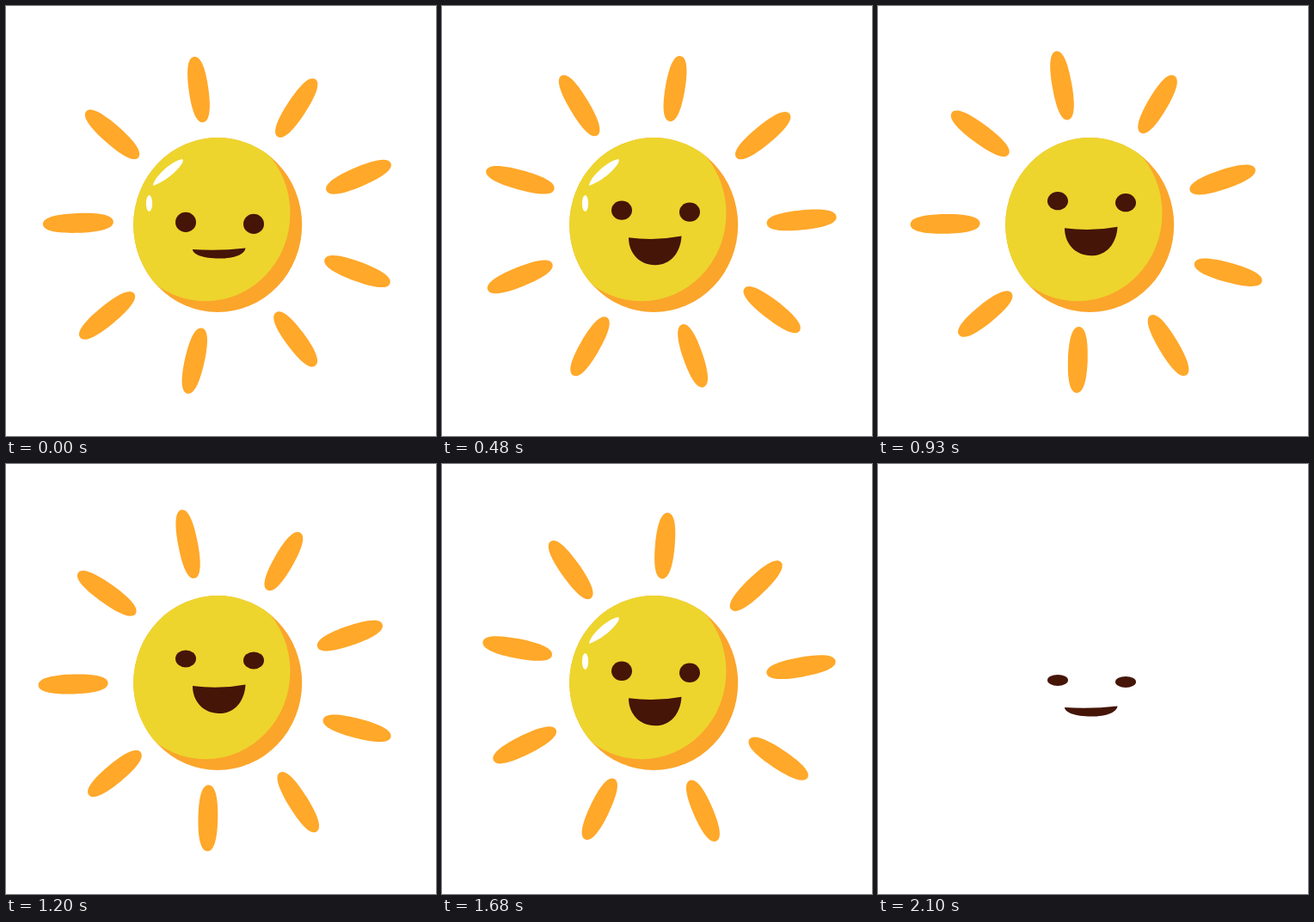
These frames come from a looping animation (500 by 500 pixels, 2.13 s). An HTML page with a canvas:

```html
<!DOCTYPE html>
<html lang="en">
<head>
<meta charset="utf-8">
<title>Smiling sun</title>
<style>
html, body { margin: 0; width: 100%; height: 100%; overflow: hidden; background: #fff; }
canvas { display: block; width: 500px; height: 500px; }
</style>
</head>
<body>
<canvas id="stage" width="500" height="500"></canvas>
<script>
const ctx = document.getElementById('stage').getContext('2d');
const LOOP = 2130, STEP = 30, SUN_END = 2100, TOP = 1050, REST = 2070;
const YELLOW = '#edd52d', BROWN = '#451508';

// One entry per ray: angle offset, distance, own tilt, half length
const RAYS = [
  [-0.2, 159, 2, 38.5], [2.3, 160.5, 0.5, 40], [0.6, 168, -4, 40.7],
  [-1.1, 166.4, 1.2, 40.5], [-2.9, 158.5, -4, 38.5], [1.1, 162, 1.2, 39],
  [1.3, 170.7, -1, 40.5], [0.2, 167.4, -2.5, 41], [-1, 165, 2.3, 40.5]
];

// Keys: [time, value]
const LIFT = [[0, 0], [480, 13.8], [720, 20.2], [1050, 25.8], [1200, 25], [1500, 16], [1890, 4.8], [2100, 0]];
const EYE = [[0, 11.6], [480, 11.2], [720, 11], [1200, 10], [1500, 11.3], [1680, 11.3], [1860, 1], [1920, 1], [2100, 6.5]];
const MOUTH = [[0, 10.5], [40, 10.5], [400, 32], [1680, 32], [2080, 10.5]];
const GLOSS = [[0, 1], [570, 1], [660, 0], [1440, 0], [1530, 1], [1710, 1], [1800, 0]];

const rad = deg => deg * Math.PI / 180;
const clamp = u => Math.min(1, Math.max(0, u));
const smooth = u => u * u * (3 - 2 * u);
const linear = u => u;

function keyed(keys, t, ease) {
  for (let i = 1; i < keys.length; i++) {
    const [t0, a] = keys[i - 1], [t1, b] = keys[i];
    if (t <= t1) return a + (b - a) * ease((t - t0) / (t1 - t0));
  }
  return keys[keys.length - 1][1];
}

// Cubic curve through the keys, level at the extremes
function curve(keys, t) {
  const last = keys.length - 1;
  const slope = i => {
    const p = keys[Math.max(0, i - 1)], k = keys[i], n = keys[Math.min(last, i + 1)];
    if (i > 0 && i < last && (k[1] - p[1]) * (n[1] - k[1]) <= 0) return 0;
    return (n[1] - p[1]) / (n[0] - p[0]);
  };
  let i = 0;
  while (i < last - 1 && t > keys[i + 1][0]) i++;
  const [t0, a] = keys[i], [t1, b] = keys[i + 1];
  const d = t1 - t0, u = clamp((t - t0) / d), s = smooth(u);
  return a + (b - a) * s + d * u * (1 - u) * ((1 - u) * slope(i) - u * slope(i + 1));
}

function ellipse(x, y, rx, ry, color) {
  ctx.fillStyle = color;
  ctx.beginPath();
  ctx.ellipse(x, y, rx, ry, 0, 0, 2 * Math.PI);
  ctx.fill();
}

function drawRay(x, y, angle, h) {
  const w = 11.4;
  ctx.save();
  ctx.translate(x, y);
  ctx.rotate(rad(angle - 90));
  ctx.beginPath();
  ctx.moveTo(-h, 0);
  ctx.bezierCurveTo(-h, -9, -h / 2, -w, 0, -w);
  ctx.bezierCurveTo(h / 2, -w, h, -9, h, 0);
  ctx.bezierCurveTo(h, 9, h / 2, w, 0, w);
  ctx.bezierCurveTo(-h / 2, w, -h, 9, -h, 0);
  ctx.fill();
  ctx.restore();
}

function drawRays(t, color) {
  const swing = smooth(t < TOP ? t / TOP : clamp((REST - t) / (REST - TOP)));
  const cx = 251.3 - 2.6 * swing, cy = 253.8;
  ctx.fillStyle = color;
  RAYS.forEach(([offset, dist, tilt, half], i) => {
    const a = -9.7 + 40 * swing + 40 * i + offset;
    drawRay(cx + dist * Math.sin(rad(a)), cy - dist * Math.cos(rad(a)), a + tilt, half);
  });
}

function drawBody(gloss, shade) {
  ctx.save();
  ellipse(246.2, 254.5, 98, 101.5, shade);
  ctx.clip();
  ellipse(232, 241, 98.5, 102.3, YELLOW);
  ctx.restore();
  if (gloss <= 0) return;
  ctx.globalAlpha = gloss;
  ellipse(166.5, 229.5, 3.6, 9.6, '#fff');
  ctx.beginPath();
  ctx.moveTo(171, 209);
  ctx.bezierCurveTo(171, 201, 190, 181, 205, 178);
  ctx.bezierCurveTo(210, 181, 191, 202, 171, 209);
  ctx.fill();
  ctx.globalAlpha = 1;
}

function drawFace(t) {
  const lift = curve(LIFT, t), eye = keyed(EYE, t, smooth), depth = keyed(MOUTH, t, smooth);
  ellipse(209, 251.4 - lift, 12, eye, BROWN);
  ellipse(288, 253.4 - lift, 12, eye, BROWN);
  const y = 283 - lift, low = y + depth;
  ctx.beginPath();
  ctx.moveTo(217, y);
  ctx.quadraticCurveTo(248, y + 1 + depth / 10, 278.5, y - 1.6);
  ctx.bezierCurveTo(277.5, y + depth * 0.55, 266, low, 248, low);
  ctx.bezierCurveTo(229, low, 217, y + depth * 0.55, 217, y);
  ctx.fill();
}

function draw(now) {
  const t = Math.floor((now % LOOP) / STEP) * STEP;
  ctx.fillStyle = '#fff';
  ctx.fillRect(0, 0, 500, 500);
  if (t < SUN_END) {
    const gloss = keyed(GLOSS, t, linear);
    const dull = t >= 1470 && t < 1530;
    drawRays(t, dull ? '#e4a52f' : '#ffa829');
    drawBody(gloss, dull ? '#e4a52f' : '#fba52b');
  }
  drawFace(t);
}

let start;
function tick(now) {
  if (start === undefined) start = now;
  draw(now - start);
  requestAnimationFrame(tick);
}
draw(0);
requestAnimationFrame(tick);
</script>
</body>
</html>
```
